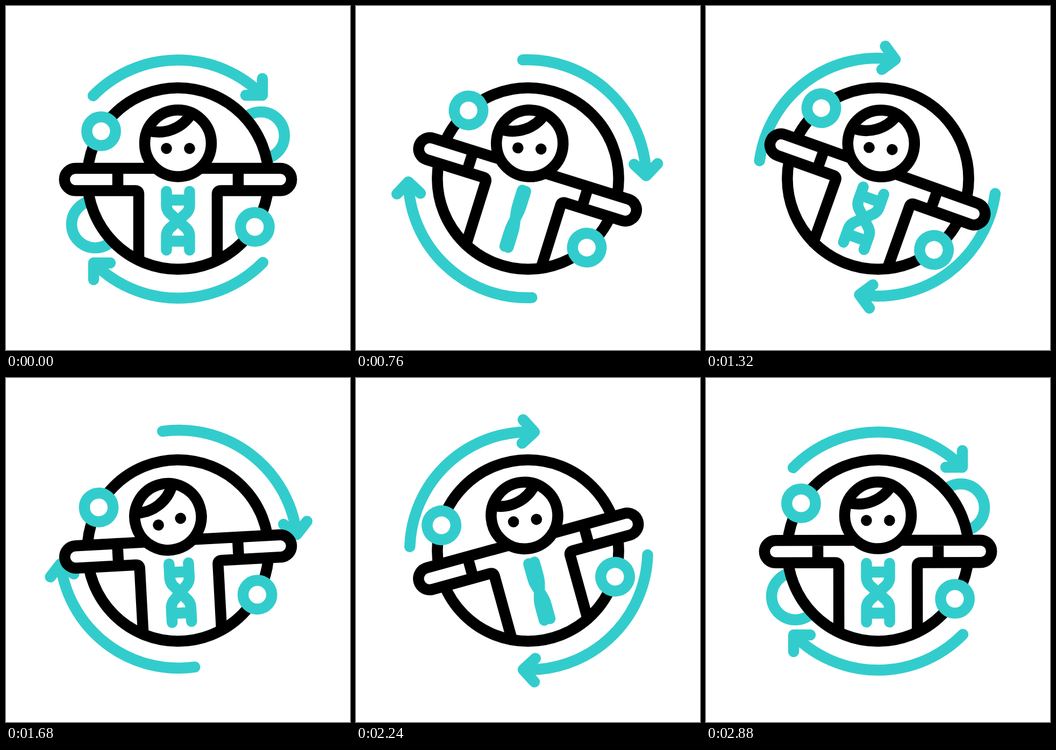
Write an HTML page that moves like this. It is 640 px wide and 640 px high and loops after 3000 ms.

```html
<!DOCTYPE html>
<html lang="en">
<head>
<meta charset="utf-8">
<title>Rotating figure</title>
<style>
  html, body { margin: 0; width: 100%; height: 100%; overflow: hidden; background: #fff; }
  svg { display: block; width: 100%; height: 100%; }
  svg * { stroke-linecap: round; stroke-linejoin: round; }
  .line, .teal { fill: none; stroke: #000; stroke-width: 20.5; }
  .teal { stroke: #33cccc; }
  .white { fill: #fff; }
</style>
</head>
<body>
<svg viewBox="0 0 640 640">
  <defs>
    <path id="arrow" class="teal" d="M162 167A221 221 0 0 1 477 166M446 166H477V135"/>
  </defs>
  <g id="arrows">
    <use href="#arrow"/>
    <use href="#arrow" transform="rotate(180 320 322)"/>
  </g>
  <circle id="ringR" class="teal" cx="474" cy="241" r="44"/>
  <circle id="ringL" class="teal" cx="166" cy="406" r="44"/>
  <circle class="line white" cx="320" cy="321" r="168.7"/>
  <g id="body">
    <rect class="white" x="109" y="302" width="422" height="41.5" rx="20.7"/>
    <path class="line" d="M247 473V350Q247 343.5 240 343.5H129.5A20.7 20.7 0 0 1 129.5 302H510.5A20.7 20.7 0 0 1 510.5 343.5H400Q393 343.5 393 350V473M208 302V343.5M432 302V343.5"/>
    <path id="dna" class="teal"/>
    <circle class="teal white" cx="177" cy="233" r="26.7"/>
    <circle class="teal white" cx="463" cy="411" r="26.7"/>
    <g id="head">
      <circle class="line white" cx="320" cy="255.5" r="62"/>
      <path class="line" d="M266 232C295 240 328 228 345 200"/>
      <circle cx="298.5" cy="265" r="10.3"/>
      <circle cx="341.5" cy="265" r="10.3"/>
    </g>
  </g>
</svg>
<script>
  const LOOP = 3000, STEP = 40;

  // Each track is a list of [time in ms, value]; values ease in and out between keys.
  const tracks = {
    arrows: [[197, 0], [2797, 360]],
    body: [[200, 0], [1100, 25.5], [2050, -17.6], [2910, 0]],
    head: [[200, 0], [700, -14.5], [1635, -14.5], [2085, 14.5], [2480, 0]],
    twist: [[200, 1], [1445, -1], [2800, 1]],
    slide: [[200, 0], [800, 80], [2200, 80], [2805, 0]]
  };

  const $ = id => document.getElementById(id);

  function valueAt(keys, t) {
    if (t <= keys[0][0]) return keys[0][1];
    for (let i = 1; i < keys.length; i++) {
      const [t0, a] = keys[i - 1], [t1, b] = keys[i];
      if (t < t1) {
        const s = (t - t0) / (t1 - t0);
        return a + (b - a) * s * s * (3 - 2 * s);
      }
    }
    return keys[keys.length - 1][1];
  }

  function strand(w) {
    const x = k => (320 + k * w).toFixed(2);
    return `M${x(-21.5)} 345V371Q${x(-21.5)} 379 ${x(-16)} 385` +
      `L${x(16)} 414Q${x(21.5)} 420 ${x(21.5)} 428V454`;
  }

  function dnaPath(w) {
    const rung = y => `M${320 - 21.5 * w} ${y}L${320 + 21.5 * w} ${y}`;
    return strand(w) + strand(-w) + rung(361) + rung(437.5);
  }

  function turn(id, deg) {
    $(id).setAttribute('transform', `rotate(${deg} 320 320)`);
  }

  function draw(t) {
    const at = name => valueAt(tracks[name], t);
    for (const id of ['arrows', 'body', 'head']) turn(id, at(id));
    $('dna').setAttribute('d', dnaPath(at('twist')));
    const dx = at('slide');
    $('ringR').setAttribute('cx', 474 - dx);
    $('ringL').setAttribute('cx', 166 + dx);
  }

  const start = performance.now();
  function tick() {
    const t = (performance.now() - start) % LOOP;
    draw(Math.floor(t / STEP) * STEP);
    requestAnimationFrame(tick);
  }
  draw(0);
  requestAnimationFrame(tick);
</script>
</body>
</html>
```
